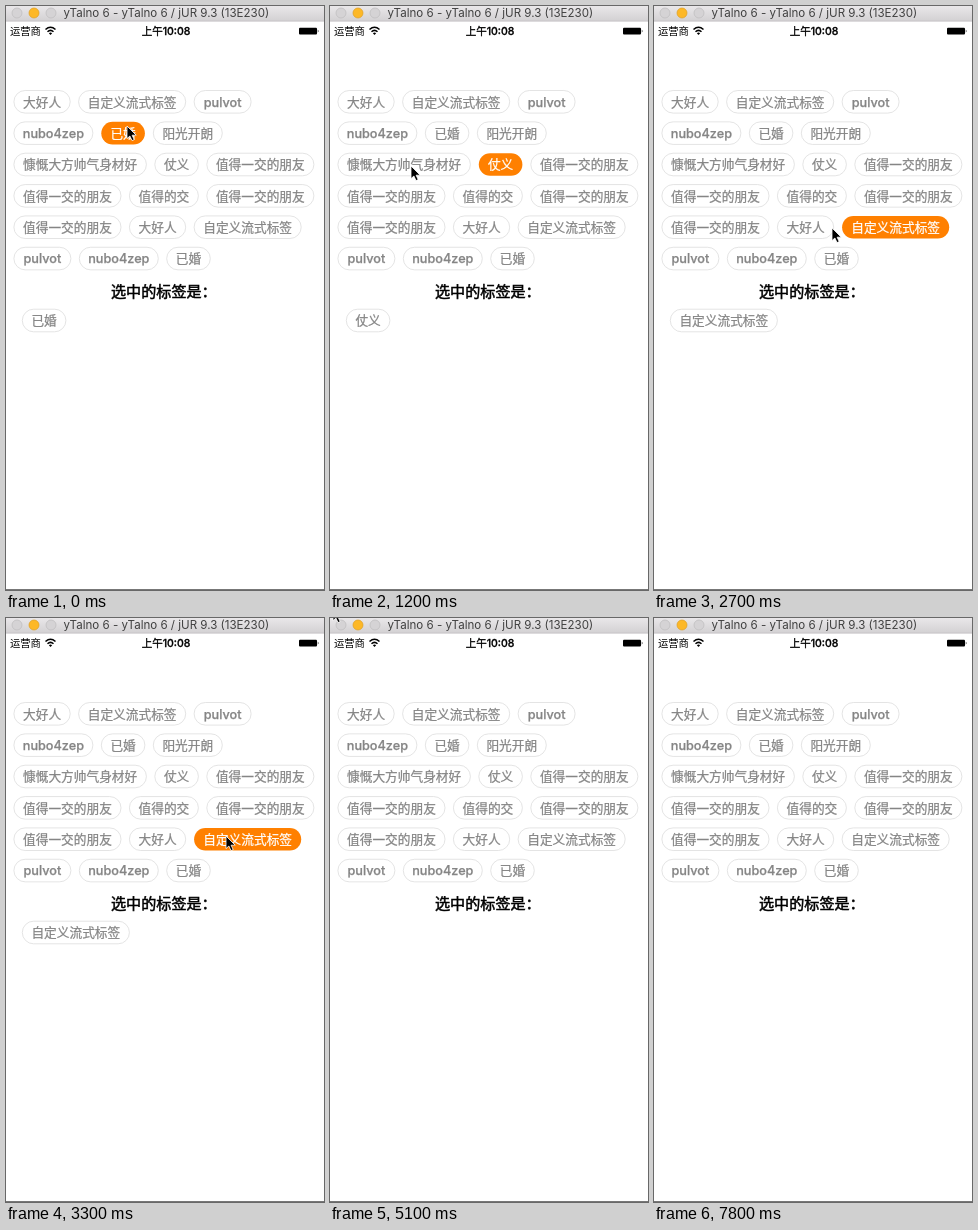
Write an HTML page that moves like this. It is 318 by 584 pixels and loops after 8000 ms.

```html
<!DOCTYPE html>
<html lang="zh-CN">
<head>
<meta charset="utf-8">
<style>
  html, body { margin: 0; height: 100%; overflow: hidden; background: #fff; }
  svg { display: block; font-family: Inter, "Noto Sans CJK SC", "Noto Sans CJK", sans-serif; }
  .tag rect { fill: #fff; stroke: #d9d9d9; stroke-width: .7; }
  .tag text { fill: #858585; stroke: #858585; stroke-width: .25; font-size: 12.7px; font-weight: 500; text-anchor: middle; }
  .tag.on rect { fill: #ff8000; stroke: none; }
  .tag.on text { fill: #fff; stroke: #fff; }
</style>
</head>
<body>
<svg id="stage" width="318" height="584" viewBox="0 0 318 584">
  <defs>
    <linearGradient id="bar" x2="0" y2="1">
      <stop stop-color="#e9e7e9"/><stop offset="1" stop-color="#d3d1d3"/>
    </linearGradient>
  </defs>
  <rect width="318" height="15" fill="url(#bar)"/>
  <path d="M0 15.2H318" stroke="#b9b7b9" stroke-width=".7"/>
  <g stroke-width=".7">
    <circle cx="11" cy="7" r="5" fill="#d5d3d5" stroke="#bebcbe"/>
    <circle cx="28" cy="7" r="5" fill="#fdb827" stroke="#dfa023"/>
    <circle cx="45" cy="7" r="5" fill="#d5d3d5" stroke="#bebcbe"/>
  </g>
  <text x="57.5" y="11" font-size="11.55" fill="#404040">yTalno 6 - yTalno 6 / jUR 9.3 (13E230)</text>

  <text x="4" y="28.8" font-size="10.3">运营商</text>
  <g fill="none" stroke="#000" stroke-width="1.5">
    <path d="M39.5 23.5Q44.5 19 49.5 23.5M41.5 25.8Q44.5 23 47.5 25.8"/>
    <path d="M44.5 29L42.9 27.2Q44.5 25.9 46.1 27.2Z" fill="#000" stroke="none"/>
  </g>
  <text x="160" y="28.8" font-size="10.5" font-weight="500" text-anchor="middle" stroke="#000" stroke-width=".3">上午10:08</text>
  <rect x="293" y="21.8" width="18" height="6.6" rx="1"/>
  <path d="M311.8 23.5q1.6 1.6 0 3.2z"/>

  <text x="105" y="291" font-size="15.1" font-weight="500" stroke="#000" stroke-width=".5">选中的标签是：</text>
  <path d="M0 583.5H318" stroke="#777"/>
</svg>
<script>
const stage = document.getElementById('stage');
const rows = [
  '大好人 自定义流式标签 pulvot',
  'nubo4zep 已婚 阳光开朗',
  '慷慨大方帅气身材好 仗义 值得一交的朋友',
  '值得一交的朋友 值得的交 值得一交的朋友',
  '值得一交的朋友 大好人 自定义流式标签',
  'pulvot nubo4zep 已婚'
].map(row => row.split(' '));
const labels = rows.flat();
const latinWidth = { pulvot: 57, nubo4zep: 79 };
const tagWidth = label => latinWidth[label] || label.length * 12.7 + 18.2;

function add(parent, name, attrs, text = '') {
  const el = document.createElementNS('http://www.w3.org/2000/svg', name);
  for (const key in attrs) el.setAttribute(key, attrs[key]);
  el.textContent = text;
  return parent.appendChild(el);
}

function addTag(label, x, y) {
  const g = add(stage, 'g', { class: 'tag' }), width = tagWidth(label);
  add(g, 'rect', { x, y: y - 11.3, width, height: 22.6, rx: 11.3 });
  add(g, 'text', { x: x + width / 2, y: y + 4.7 }, label);
  return g;
}

const tags = rows.flatMap((row, i) => {
  let x = 7.9;
  return row.map(label => {
    const tag = addTag(label, x, 95.8 + i * 31.35);
    x += tagWidth(label) + 8.4;
    return tag;
  });
});
const results = labels.map(label => addTag(label, 16.3, 314.5));
const cursor = add(stage, 'path', {
  d: 'M0 0V12.6L2.9 10L5 14.6L7.2 13.6L5.1 9.2H9.2Z',
  stroke: '#fff', 'stroke-width': .8
});

// Every 300 ms: selected tag, pointer x and y, and the listed tag if it differs.
const STEP = 300, LOOP = 8000, NONE = -1, hidden = [NONE, -50, -50];
const steps = [
  [4, 121, 120], [5, 203, 99], [2, 279, 135], [8, 176, 153], [7, 81, 160],
  [6, 75, 184], [9, 191, 183], [NONE, 273, 184, 9], [11, 245, 203],
  [14, 178, 222], [13, 200, 220], [14, 220, 218], [NONE, 219, 218],
  [NONE, 180, 340], hidden, hidden, hidden,
  [NONE, 3, -10], [NONE, 82, 73], [NONE, 43, 33], [NONE, 24, 20],
  [NONE, 35, 23], [NONE, 5, 4], [NONE, 21, 4], [NONE, 27, 5], [NONE, 27, 5], hidden
];

function draw(now) {
  const [selected, x, y, listed = selected] = steps[Math.floor(now % LOOP / STEP)];
  tags.forEach((tag, i) => tag.classList.toggle('on', i === selected));
  results.forEach((tag, i) => tag.style.display = i === listed ? '' : 'none');
  cursor.setAttribute('transform', `translate(${x} ${y})`);
  requestAnimationFrame(draw);
}
draw(performance.now());
</script>
</body>
</html>
```
